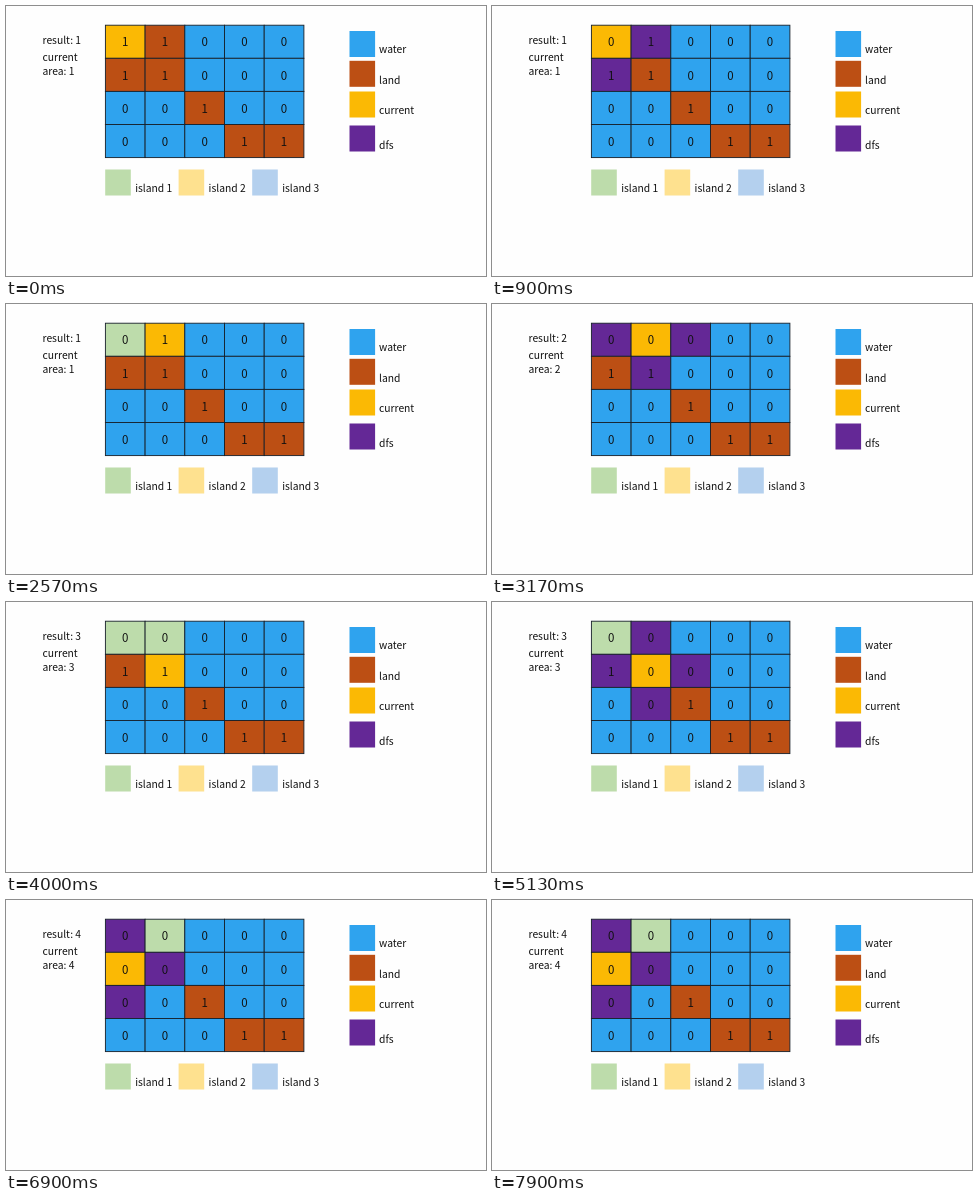
An HTML page that plays this animation: 480x270 px, repeating every 8000 ms.

```html
<!DOCTYPE html>
<html lang="en">
<head>
<meta charset="utf-8">
<title>Island area by depth-first search</title>
<style>
  html, body { margin: 0; width: 100%; height: 100%; overflow: hidden; background: #fefefe; }
  svg { display: block; width: 480px; height: 270px; }
  text { font: 10.3px "Noto Sans CJK SC", "Noto Sans CJK JP", "Noto Sans", sans-serif; fill: #111; }
  .digit { font-size: 11.5px; text-anchor: middle; }
  .cell { stroke: #17202a; stroke-width: 0.9; }
</style>
</head>
<body>
<svg id="stage" viewBox="0 0 480 270"></svg>
<script>
const LOOP = 8000;
const COLORS = {
  water: '#2fa3ee', land: '#bc4f14', current: '#fbb904', dfs: '#642896',
  'island 1': '#bddcab', 'island 2': '#fee18f', 'island 3': '#b4d0ee'
};
const GRID = ['11000', '11000', '00100', '00011'];
const GRID_X = 99.4, GRID_Y = 19.2, CELL_W = 39.7, CELL_H = 33.1;

// Each cell has two slides of one second: arrive, then sink it and mark its neighbours.
const PATH = ['0,0', '0,1', '1,1', '1,0'];
const AREAS = [1, 1, 1, 2, 3, 3, 4, 4];
const SLIDE = 1000, LEAD = 100;

const stage = document.getElementById('stage');

function add(tag, attrs, content = '') {
  const node = document.createElementNS('http://www.w3.org/2000/svg', tag);
  for (const key in attrs) node.setAttribute(key, attrs[key]);
  node.textContent = content;
  return stage.appendChild(node);
}
const label = (x, y, content) => add('text', { x, y }, content);

function swatch(name, x, y, textX, textY) {
  add('rect', { x, y, width: 25.6, height: 26, fill: COLORS[name] });
  label(textX, textY, name);
}

const cells = GRID.flatMap((line, row) => [...line].map((value, col) => {
  const x = GRID_X + col * CELL_W, y = GRID_Y + row * CELL_H;
  return {
    row, col, value, id: `${row},${col}`,
    rect: add('rect', { class: 'cell', x, y, width: CELL_W, height: CELL_H }),
    text: add('text', { class: 'digit', x: x + CELL_W / 2, y: y + 21.2 }, value)
  };
}));

const result = label(36.5, 38, '');
label(36.5, 55, 'current');
const area = label(36.5, 69, '');

[['water', 25, 47], ['land', 54.8, 77.5], ['current', 85.5, 108], ['dfs', 119.5, 142.5]]
  .forEach(([name, y, textY]) => swatch(name, 343.5, y, 373, textY));
[99.2, 172.6, 246.2].forEach((x, i) => swatch(`island ${i + 1}`, x, 163.5, x + 30, 186));

function show(slide) {
  const current = Math.floor(slide / 2);
  const spread = slide % 2 === 1;
  const [curRow, curCol] = PATH[current].split(',').map(Number);
  for (const { id, row, col, value, rect, text } of cells) {
    const order = PATH.indexOf(id);
    const visited = order >= 0 && order < current;
    const distance = Math.abs(row - curRow) + Math.abs(col - curCol);
    const kind = distance === 0 ? 'current'
      : spread && distance === 1 ? 'dfs'
      : visited ? 'island 1'
      : value === '1' ? 'land' : 'water';
    rect.setAttribute('fill', COLORS[kind]);
    text.textContent = visited || (distance === 0 && spread) ? '0' : value;
  }
  result.textContent = `result: ${AREAS[slide]}`;
  area.textContent = `area: ${AREAS[slide]}`;
}

let shown;
function tick() {
  const time = performance.now() % LOOP;
  const slide = Math.min(AREAS.length - 1, Math.floor((time + LEAD) / SLIDE));
  if (slide !== shown) show(shown = slide);
  requestAnimationFrame(tick);
}
tick();
</script>
</body>
</html>
```
